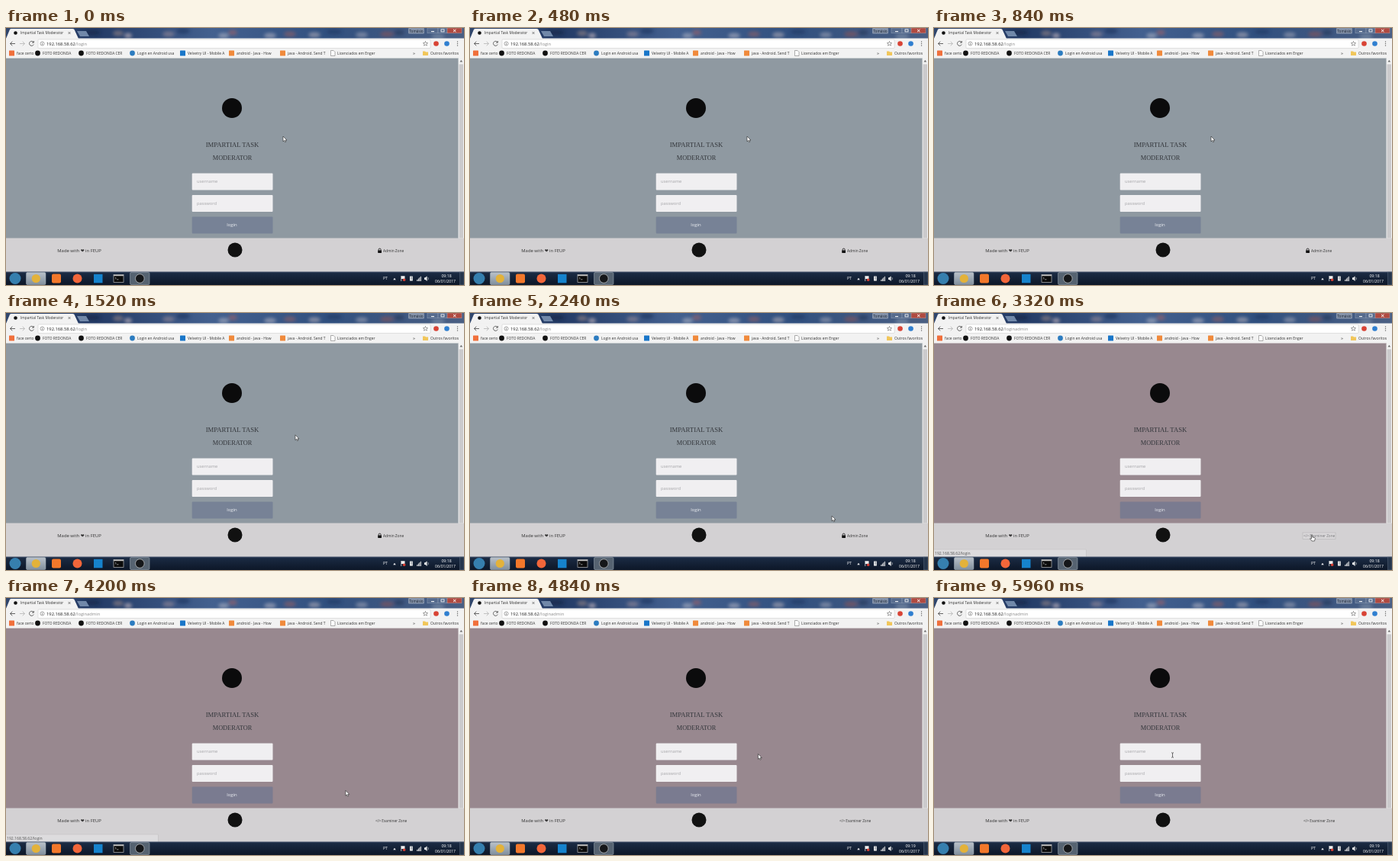
These frames come from a looping animation (600 px wide and 337 px high, 6 s). An HTML page:

```html
<!DOCTYPE html>
<html lang="pt">
<head>
<meta charset="utf-8">
<title>Login</title>
<style>
html, body { margin: 0; width: 100%; height: 100%; overflow: hidden; }
svg { display: block; width: 600px; height: 337px; }
text { font-family: "Open Sans", sans-serif; white-space: pre; }
.serif { font-family: "Liberation Serif", serif; }
</style>
</head>
<body>
<svg id="stage" viewBox="0 0 600 337">
  <defs>
    <linearGradient id="sky">
      <stop offset="0" stop-color="#30466c"/><stop offset=".2" stop-color="#243b66"/>
      <stop offset=".45" stop-color="#43608f"/><stop offset=".7" stop-color="#31507f"/>
      <stop offset="1" stop-color="#4a5f83"/>
    </linearGradient>
    <linearGradient id="bar" x2="0" y2="1">
      <stop offset="0" stop-color="#41506a"/><stop offset=".12" stop-color="#1a2a42"/>
      <stop offset="1" stop-color="#0d1728"/>
    </linearGradient>
    <linearGradient id="pressed" x2="0" y2="1">
      <stop offset="0" stop-color="#b9c1c9"/><stop offset="1" stop-color="#82909e"/>
    </linearGradient>
    <filter id="soft"><feGaussianBlur stdDeviation="2"/></filter>
    <clipPath id="top"><rect width="600" height="14"/></clipPath>
  </defs>
  <g id="chrome"></g>
  <g id="page"></g>
  <g id="taskbar"></g>
  <g id="pointer" stroke-linejoin="round">
    <path id="arrow" d="M0 0V6.8L1.6 5.4 2.6 7.7 3.8 7.2 2.8 5H4.9Z" fill="#fff" stroke="#222" stroke-width=".6"/>
    <path id="hand" d="M0 0Q.8-.7 1.3.1V3L4.2 3.6Q5 4 4.8 5L4 8H.5L-2 4.8Q-1.7 3.8 0 5Z" fill="#fff" stroke="#222" stroke-width=".6"/>
    <path id="beam" d="M-1.5-3.2Q0-3.2 0-2.5Q0-3.2 1.5-3.2M0-2.5V2.5M-1.5 3.2Q0 3.2 0 2.5Q0 3.2 1.5 3.2" fill="none" stroke="#333" stroke-width=".7"/>
  </g>
</svg>
<script>
const $ = id => document.getElementById(id);
const rect = (x, y, w, h, fill, more = '') =>
  `<rect x="${x}" y="${y}" width="${w}" height="${h}" fill="${fill}" ${more}/>`;
const dot = (x, y, r, fill, more = '') => `<circle cx="${x}" cy="${y}" r="${r}" fill="${fill}" ${more}/>`;
const line = (d, color, width = .7, more = '') =>
  `<path d="${d}" fill="none" stroke="${color}" stroke-width="${width}" ${more}/>`;
const shape = (d, fill) => `<path d="${d}" fill="${fill}"/>`;
const text = (x, y, size, fill, label, more = '') =>
  `<text x="${x}" y="${y}" font-size="${size}" fill="${fill}" ${more}>${label}</text>`;
const middle = 'text-anchor="middle"';

function drawChrome() {
  // blurred wallpaper behind the glass title bar: x, y, rx, colour
  const blobs = [[112, 6, 12, '#172746'], [147, 7, 7, '#8d7f83'], [160, 10, 5, '#c4b6bd'],
    [213, 8, 8, '#8f8595'], [232, 4, 9, '#1f3560'], [285, 10, 7, '#a5abbd'], [297, 6, 6, '#95616a'],
    [346, 10, 8, '#a9abbd'], [372, 8, 8, '#8a5e68'], [404, 9, 8, '#a8a5b2'], [430, 5, 10, '#213a66'],
    [466, 9, 8, '#959cb1'], [499, 8, 9, '#82535c'], [515, 6, 7, '#28375a'], [566, 11, 9, '#7d8fa9']];
  const glass = blobs.map(([x, y, r, c]) => `<ellipse cx="${x}" cy="${y}" rx="${r}" ry="3.5" fill="${c}"/>`).join('');
  const marks = [['face certo', 14, '#f0703c', 1], ['FOTO REDONDA', 48, '#111'], ['FOTO REDONDA CER', 105, '#111'],
    ['Login en Android usa', 172, '#2c7cc0'], ['Velvetry UI - Mobile A', 238, '#1976c9', 1],
    ['android - Java - How', 302, '#f08a3c', 1], ['java - Android. Send T', 369, '#f08a3c', 1]];
  $('chrome').innerHTML =
    rect(0, 0, 600, 14, 'url(#sky)') +
    `<g clip-path="url(#top)" opacity=".65"><g filter="url(#soft)">${glass}</g></g>` +
    shape('M93 4H105L109 11H97Z', '#7188a9') +
    shape('M0 14L5 2Q5.5 1 7 1H87Q89 1 89.5 2L95 14Z', '#f2f2f2') +
    dot(12.5, 6.5, 2.3, '#111') + text(19, 8.2, 4.8, '#333', 'Impartial Task Moderator') +
    line('M81.5 5L84.5 8M84.5 5L81.5 8', '#555') +
    rect(527, 0, 21, 7.5, '#8492a9', 'rx="1"') + text(537.5, 5.6, 4.7, '#16202f', 'Tomásio', middle) +
    rect(552, 0, 14, 6.8, '#566b8d', 'stroke="#91a0b8" stroke-width=".5"') +
    rect(566, 0, 12, 6.8, '#566b8d', 'stroke="#91a0b8" stroke-width=".5"') +
    rect(578, 0, 19, 6.8, '#b04a40', 'stroke="#b59a9f" stroke-width=".5"') +
    line('M557 4.6H561M586 1.9L589.5 5.1M589.5 1.9L586 5.1', '#fff', 1) +
    rect(570, 1.9, 4, 3, 'none', 'stroke="#fff" stroke-width=".8"') +
    rect(0, 13.5, 600, 26.5, '#f2f2f2') +
    line('M12 20.5H5.5M8.3 17.7L5.5 20.5L8.3 23.3', '#555', .9) +
    line('M18 20.5H24.5M21.7 17.7L24.5 20.5L21.7 23.3', '#bbb', .9) +
    line('M36 18.6A3 3 0 1 0 36.3 21.5M36.4 17V19.2H34.1', '#555', .9) +
    rect(42, 15, 514, 11.5, '#fff', 'rx="1" stroke="#c4c4c4" stroke-width=".5"') +
    dot(47.5, 20.5, 2.5, 'none', 'stroke="#666" stroke-width=".6"') + line('M47.5 20V22M47.5 18.8V19.4', '#666') +
    text(53, 22.5, 5.8, '#222', '192.168.58.62<tspan id="path" fill="#888"></tspan>') +
    line('M549.5 17.3L550.4 19.5 552.6 19.6 550.9 21 551.5 23.2 549.5 22 547.5 23.2 548.1 21 546.4 19.6 548.6 19.5Z', '#666', .6) +
    dot(563.5, 20.5, 3.3, '#d84335') + dot(577.5, 20.5, 3.3, '#2f7fd0') +
    [18, 20.5, 23].map(y => dot(591.5, y, .7, '#666')).join('') +
    marks.map(([label, x, color, square]) =>
      (square ? rect(x - 10, 29.5, 7, 7, color, 'rx=".6"') : dot(x - 6.5, 33, 3.4, color)) +
      text(x, 34.7, 4.9, '#333', label)).join('') +
    shape('M425.5 29.5H429L431 31.5V36.5H425.5Z', '#fff') +
    line('M425.5 29.5H429L431 31.5V36.5H425.5Z', '#777', .6) +
    text(434, 34.7, 4.9, '#333', 'Licenciados em Enger') +
    text(533, 34.8, 6, '#444', '»') + shape('M546 30.5H549L550 31.5H553V36H546Z', '#f1c65a') +
    text(556, 34.7, 4.9, '#333', 'Outros favoritos');
}

function drawPage() {
  const box = (y, fill, more = '') => rect(243.7, y, 105.8, 22, fill, `rx="1" ${more}`);
  const field = (y, label) => box(y, '#f0eff1') + text(250, y + 12.9, 5.8, '#a5a5a8', label);
  $('page').innerHTML =
    rect(0, 39.6, 593, 236.4, '', 'id="back"') +
    dot(296, 105, 13, '#0b0b0c') +
    text(296.5, 155.8, 8.7, '#34373c', 'IMPARTIAL TASK', `class="serif" ${middle}`) +
    text(296.5, 173.4, 8.3, '#34373c', 'MODERATOR', `class="serif" ${middle}`) +
    field(190.4, 'username') + field(219, 'password') +
    box(247.4, '', 'id="button"') + text(296, 260.3, 6, '#eef0f4', 'login', middle) +
    rect(592.5, 39.6, 7.5, 236.4, '#f1f1f1') + rect(593.5, 47.5, 5.5, 228, '#cbcacc') +
    shape('M594.5 44.5L596.3 42 598.1 44.5Z', '#666') +
    rect(0, 275.5, 600, 45, '#d3d1d3') +
    text(67.3, 293.6, 5.9, '#333', 'Made with <tspan font-family="DejaVu Sans, sans-serif">❤\uFE0E</tspan> in FEUP') +
    dot(300, 291, 9.5, '#111') +
    rect(483, 288, 43, 8.5, '#d9d7d9', 'id="hover" stroke="#b5b4b6" stroke-width=".6"') +
    `<g id="admin">${rect(487.2, 291.5, 4.8, 3.5, '#111', 'rx=".4"')}${line('M488.1 292V290.6A1.5 1.5 0 0 1 491.1 290.6V292', '#111', .8)}
     ${text(494, 294.2, 4.8, '', 'Admin Zone', 'class="link"')}</g>` +
    `<g id="examiner">${text(484, 294.2, 4.7, '', '&lt;/&gt; Examiner Zone', 'class="link"')}</g>` +
    `<g id="status">${rect(-1, 310, 200.5, 11, '#dddcde', 'rx="1" stroke="#bcbbbd" stroke-width=".5"')}
     ${text(1, 317.2, 5.1, '#555', '', 'id="target"')}</g>`;
}

function drawTaskbar() {
  const app = (x, active) => rect(x, 320.5, 25.5, 16, active ? 'url(#pressed)' : '#566371',
    'rx="1.5" stroke="#a5b0bb" stroke-width=".5"');
  $('taskbar').innerHTML =
    rect(0, 319.5, 600, 17.5, 'url(#bar)') +
    dot(12, 328.5, 7.5, '#367fae') +
    app(26.5, true) + dot(39.3, 328.5, 5.6, '#e3b23a') +
    rect(60, 322.5, 12, 12, '#f3782b', 'rx="2"') +
    dot(93.5, 328.5, 6, '#f2663a') +
    rect(115, 322.8, 11.5, 11.5, '#1683cd') +
    rect(141, 323.5, 13, 10, '#0b0b0b', 'stroke="#bbb" stroke-width=".7"') + rect(141, 323.5, 13, 1.7, '#bbb') +
    line('M143 327L144.3 328.2 143 329.4M145 329.8H147.5', '#ddd', .6) +
    app(162.5) + dot(175.3, 328.5, 5.8, '#15171a', 'stroke="#ddd" stroke-width=".6"') +
    text(497, 330.2, 5.2, '#fff', 'PT', middle) +
    shape('M507.3 330.2L509 327.7 510.7 330.2Z', '#fff') +
    line('M517.7 325V332', '#eee', .7) + shape('M518 325.2H522.5V329H518Z', '#eee') + dot(521.6, 330.3, 1.8, '#d83d32') +
    rect(529, 325.5, 3.8, 6, '#eee') + line('M530 327H532M530 329H532', '#345', .6) +
    [0, 1, 2, 3].map(i => rect(538.3 + i * 1.5, 330 - i * 1.4, 1, 2 + i * 1.4, '#eee')).join('') +
    shape('M548 327.2H549.4L551.5 325.3V332L549.4 330.1H548Z', '#eee') + line('M552.7 327Q554 328.7 552.7 330.4', '#eee', .6) +
    text(577, 326.6, 5.2, '#fff', '', `id="clock" ${middle}`) +
    text(575.5, 334.4, 5.1, '#fff', '06/01/2017', middle) +
    rect(594.5, 320, 5.5, 17, '#26364c', 'stroke="#5c6b7e" stroke-width=".5"');
}

// time, x, y of the pointer's hot spot
const route = [[0, 363, 142], [1400, 363, 142], [2240, 474, 266], [2720, 494.5, 291], [3700, 494.5, 291],
  [4200, 445, 252.5], [4840, 377.5, 204.5], [5560, 312.5, 206], [6000, 312.5, 206]];

function pointerAt(t) {
  const i = route.findIndex(p => p[0] > t);
  const [a, b] = [route[i - 1], route[i]];
  const k = (t - a[0]) / (b[0] - a[0]);
  return [a[1] + (b[1] - a[1]) * k, a[2] + (b[2] - a[2]) * k];
}

const show = (id, on) => $(id).style.display = on ? '' : 'none';

function draw(now) {
  const t = now % 6000;
  const [x, y] = pointerAt(t);
  const admin = t >= 3200;
  const clicked = t >= 3120;
  const overLink = x > 483 && x < 526 && y > 288 && y < 297;
  const overField = x > 244 && x < 349 && y > 190 && y < 241;
  $('pointer').setAttribute('transform', `translate(${x} ${y})`);
  show('hand', overLink);
  show('beam', overField);
  show('arrow', !overLink && !overField);
  show('hover', overLink);
  show('admin', !admin);
  show('examiner', admin);
  document.querySelectorAll('.link').forEach(e => e.setAttribute('fill', overLink ? '#77777b' : '#333'));
  $('back').setAttribute('fill', admin ? '#98888f' : '#8f99a1');
  $('button').setAttribute('fill', admin ? '#7a7b90' : '#778296');
  $('path').textContent = clicked ? '/loginadmin' : '/login';
  show('status', t > 2720 && t < 4360);
  $('target').textContent = '192.168.58.62/login' + (clicked ? '' : 'admin');
  $('clock').textContent = t < 4680 ? '09:18' : '09:19';
  requestAnimationFrame(draw);
}

drawChrome();
drawPage();
drawTaskbar();
draw(0);
</script>
</body>
</html>
```
